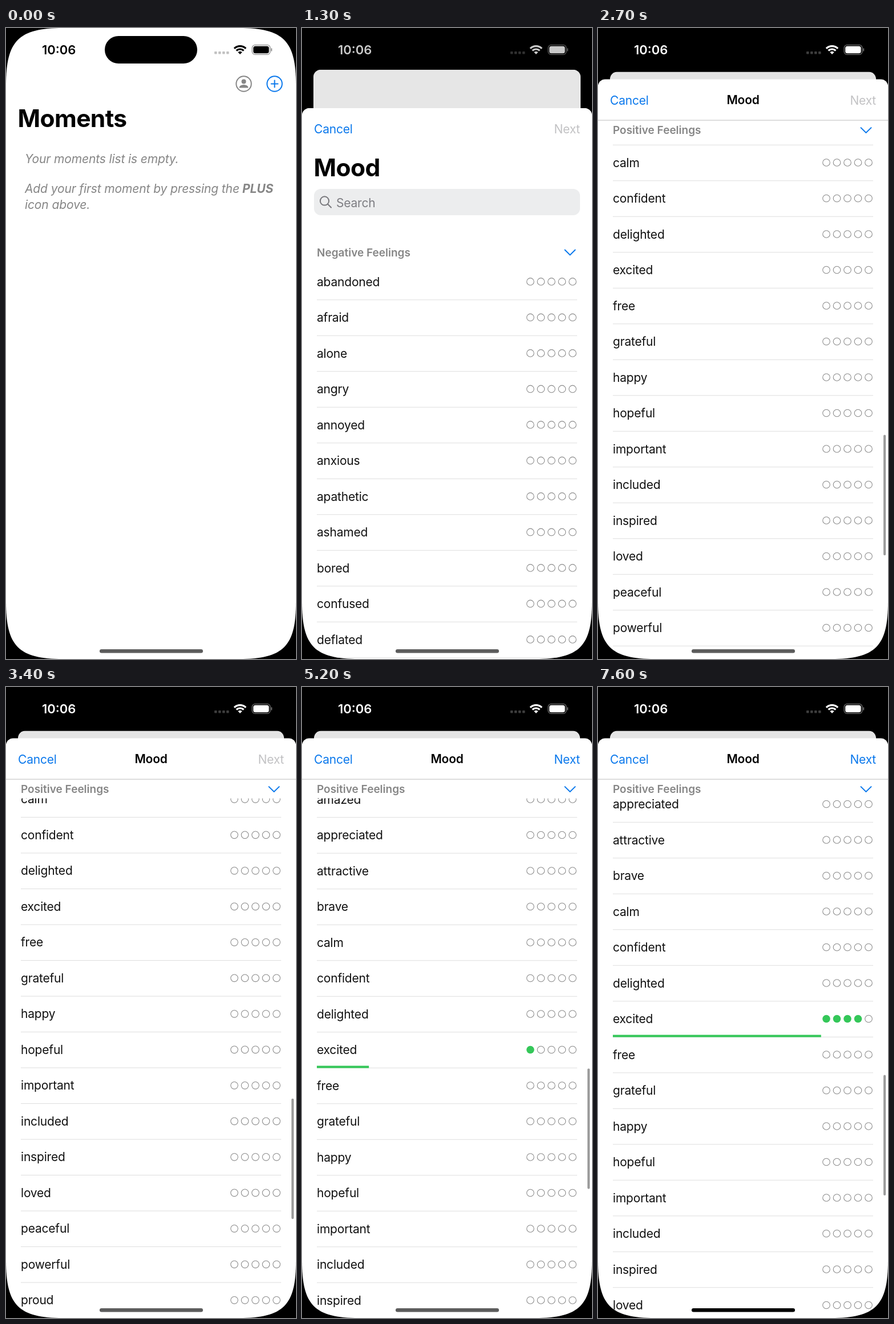
An HTML page with a canvas for the animation above (8 s loop, 508x1102 px).

```html
<!DOCTYPE html>
<html lang="en">
<head>
<meta charset="utf-8">
<title>Mood picker</title>
<style>
  html, body { margin: 0; width: 100%; height: 100%; overflow: hidden; background: #000; }
  canvas { display: block; width: 508px; height: 1102px; }
</style>
</head>
<body>
<canvas></canvas>
<script>
const W = 508, H = 1102, LOOP = 8000, STEP = 100;
const BLUE = '#0a78ec', GREEN = '#34c759', GRAY = '#868686';
const SHEET_TOP = 90, ROW = 62.5, FIRST_ROW = 393, HEADER_GAP = 51, STICKY_Y = 179;
const FAR = 2600;                       // scroll offset reached by the flick
const POSITIVE_ROW = FAR + 235.5 - 4 * ROW;

const negative = `abandoned afraid alone angry annoyed anxious apathetic ashamed bored confused deflated
  depressed disappointed disgusted embarrassed empty envious exhausted frustrated guilty helpless hurt
  insecure irritated jealous lonely nervous overwhelmed rejected sad scared stressed tired worried`.split(/\s+/);
const positive = `amazed appreciated attractive brave calm confident delighted excited free grateful happy
  hopeful important included inspired loved peaceful powerful proud relaxed respected safe`.split(/\s+/);

const canvas = document.querySelector('canvas');
const ctx = canvas.getContext('2d');
const ratio = window.devicePixelRatio || 1;
canvas.width = W * ratio;
canvas.height = H * ratio;

const clamp = x => Math.min(1, Math.max(0, x));
const span = (t, from, to) => clamp((t - from) / (to - from));
const smooth = x => x * x * (3 - 2 * x);
const easeOut = x => 1 - (1 - x) ** 2;

function text(str, x, y, color, { size = 21, weight = 400, style = '', align = 'left', spacing = -0.2 } = {}) {
  ctx.font = `${style} ${weight} ${size}px Inter, Roboto, sans-serif`;
  ctx.letterSpacing = spacing + 'px';
  ctx.textAlign = align;
  ctx.fillStyle = color;
  ctx.fillText(str, x, y + size * 0.36);
}

function rect(x, y, w, h, color, radius = 0) {
  ctx.fillStyle = color;
  ctx.beginPath();
  ctx.roundRect(x, y, w, h, radius);
  ctx.fill();
}

function circle(x, y, r, color, lineWidth) {
  ctx.beginPath();
  ctx.arc(x, y, r, 0, 2 * Math.PI);
  if (lineWidth) {
    ctx.strokeStyle = color;
    ctx.lineWidth = lineWidth;
    ctx.stroke();
  } else {
    ctx.fillStyle = color;
    ctx.fill();
  }
}

function line(points, color, width) {
  ctx.beginPath();
  points.forEach(([x, y]) => ctx.lineTo(x, y));
  ctx.strokeStyle = color;
  ctx.lineWidth = width;
  ctx.lineCap = 'round';
  ctx.stroke();
  ctx.lineCap = 'butt';
}

function clipScreen() {
  const e = 100, c = 22;
  ctx.beginPath();
  ctx.moveTo(e, 0);
  ctx.lineTo(W - e, 0);
  ctx.bezierCurveTo(W - c, 0, W, c, W, e);
  ctx.lineTo(W, H - e);
  ctx.bezierCurveTo(W, H - c, W - c, H, W - e, H);
  ctx.lineTo(e, H);
  ctx.bezierCurveTo(c, H, 0, H - c, 0, H - e);
  ctx.lineTo(0, e);
  ctx.bezierCurveTo(0, c, c, 0, e, 0);
  ctx.clip();
}

function statusBar(t) {
  const level = Math.round(255 * span(t, 1040, 1370));
  const color = `rgb(${level},${level},${level})`;
  text('10:06', 63, 38, color, { size: 22, weight: 600, spacing: 0 });
  rect(173, 14, 162, 48, '#000', 24);

  ctx.globalAlpha = 0.24;
  for (let i = 0; i < 4; i++) rect(365 + 7 * i, 41, 4.6, 4.4, color, 1);
  ctx.globalAlpha = 1;

  const arc = (r, width) => {
    ctx.beginPath();
    ctx.arc(410, 46, r, -Math.PI * 0.75, -Math.PI * 0.25);
    ctx.strokeStyle = color;
    ctx.lineWidth = width;
    ctx.stroke();
  };
  arc(14.3, 3.2);
  arc(9, 3.2);
  arc(2.6, 5.2);

  ctx.globalAlpha = 0.45;
  ctx.strokeStyle = color;
  ctx.lineWidth = 1.3;
  ctx.beginPath();
  ctx.roundRect(431.2, 29.7, 31.6, 16.6, 5);
  ctx.stroke();
  rect(464.3, 35.3, 1.8, 5.4, color, 1);
  ctx.globalAlpha = 1;
  rect(433.2, 31.7, 27.4, 12.6, color, 3.5);
}

function home(t) {
  rect(0, 0, W, H, '#fff');
  circle(416.5, 97.5, 13.2, GRAY, 2);
  circle(416.5, 93.6, 4, GRAY);
  ctx.beginPath();
  ctx.ellipse(416.5, 104.5, 8, 5.6, 0, Math.PI, 2 * Math.PI);
  ctx.fill();

  ctx.globalAlpha = t >= 1000 ? 0.35 : 1;
  circle(470.5, 97.5, 13.2, BLUE, 2);
  line([[464.6, 97.5], [476.4, 97.5]], BLUE, 2);
  line([[470.5, 91.6], [470.5, 103.4]], BLUE, 2);
  ctx.globalAlpha = 1;

  text('Moments', 20.5, 158, '#000', { size: 42.5, weight: 700, spacing: -0.6 });
  const italic = { style: 'italic', spacing: -0.12 };
  text('Your moments list is empty.', 33, 228, GRAY, italic);
  text('Add your first moment by pressing the', 33, 280, GRAY, italic);
  text('PLUS', 414, 280, GRAY, { ...italic, weight: 700 });
  text('icon above.', 33, 308.5, GRAY, italic);
}

function moodRow(word, y, score) {
  if (y < 120 || y > H + 40) return;
  text(word, 26, y, '#111');
  rect(26, y + 31.2, 456, 1, '#dedede');
  for (let i = 0; i < 5; i++) {
    const x = 400 + 18.5 * i;
    if (i < score) circle(x, y, 6.8, GREEN);
    else circle(x, y, 6.3, '#8c8c8c', 1.1);
  }
  if (score) rect(26, y + 28, 91.2 * score, 4, GREEN);
}

function sectionHeader(title, y) {
  rect(0, y - 17, W, 33, '#fff');
  text(title, 26, y, GRAY, { size: 19, weight: 600, spacing: 0 });
  line([[460.5, y - 4.4], [469.5, y + 4.4], [478.5, y - 4.4]], BLUE, 2);
}

function scrollAt(t) {
  if (t < 2700) return FAR * smooth(span(t, 2330, 2700));
  if (t < 3300) return FAR + 40 * easeOut(span(t, 2700, 3150));
  if (t < 3800) return FAR + 40 - 105.5 * span(t, 3300, 3800) ** 3;
  return FAR - 65.5 - 145.5 * easeOut(span(t, 3800, 4200)) + 54 * smooth(span(t, 7200, 7600));
}

const scoreAt = t => [5200, 5300, 5500, 6200].filter(start => t >= start).length;

function sheet(t, top) {
  const scroll = scrollAt(t), score = scoreAt(t);
  ctx.save();
  ctx.translate(0, top - SHEET_TOP);
  ctx.beginPath();
  ctx.roundRect(0, SHEET_TOP, W, H, [13, 13, 0, 0]);
  ctx.clip();
  rect(0, SHEET_TOP, W, H, '#fff');

  ctx.save();
  ctx.translate(0, -scroll);
  text('Mood', 20.5, 193.5, '#000', { size: 42.5, weight: 700, spacing: -0.6 });
  rect(21, 231, 466, 46, '#ecedee', 12);
  circle(39.5, 252, 7.6, '#77777b', 2);
  line([[45, 257.5], [51, 263.5]], '#77777b', 2);
  text('Search', 60, 255, '#7d7d82');
  ctx.restore();

  negative.forEach((word, i) => moodRow(word, FIRST_ROW + ROW * i - scroll, 0));
  positive.forEach((word, i) =>
    moodRow(word, POSITIVE_ROW + ROW * i - scroll, word === 'excited' ? score : 0));

  const positiveY = Math.max(STICKY_Y, POSITIVE_ROW - HEADER_GAP - scroll);
  const negativeY = Math.max(STICKY_Y, FIRST_ROW - HEADER_GAP - scroll);
  sectionHeader('Negative Feelings', Math.min(negativeY, positiveY - 40));
  sectionHeader('Positive Feelings', positiveY);

  rect(0, SHEET_TOP, W, 72, '#fff');
  text('Cancel', 21, 126.5, BLUE);
  text('Next', 487, 126.5, score ? BLUE : '#c2c2c4', { align: 'right' });
  ctx.globalAlpha = clamp((scroll - 85) / 20);
  text('Mood', 254, 126, '#000', { weight: 600, align: 'center' });
  rect(0, 161, W, 1.2, '#cacaca');
  ctx.globalAlpha = 1;

  if (scroll > 0) rect(500, 711 + (scroll - FAR) * 0.21, 4.2, 210.5, '#9c9c9c', 2.1);
  ctx.restore();
}

function draw(t) {
  const swing = 18.26 * Math.max(0, t - 1040) / 1000;
  const shown = 1 - (1 + swing) * Math.exp(-swing);   // critically damped spring

  ctx.setTransform(ratio, 0, 0, ratio, 0, 0);
  rect(0, 0, W, H, '#000');
  ctx.save();
  clipScreen();

  ctx.save();
  ctx.translate(21 * shown, 76.5 * shown);
  ctx.scale(1 - 42 * shown / W, 1 - 42 * shown / W);
  ctx.beginPath();
  ctx.roundRect(0, 0, W, H, shown ? 14 : 0);
  ctx.clip();
  home(t);
  rect(0, 0, W, H, `rgba(0,0,0,${0.105 * shown})`);
  ctx.restore();

  if (shown) sheet(t, H + (SHEET_TOP - 0.5 - H) * shown);
  statusBar(t);
  rect(164, 1085, 181, 6.6, t >= 7500 ? '#000' : '#5c5c5c', 3.3);
  ctx.restore();
}

function frame() {
  const t = performance.now() % LOOP;
  draw(Math.floor(t / STEP) * STEP);
  requestAnimationFrame(frame);
}
frame();
</script>
</body>
</html>
```
